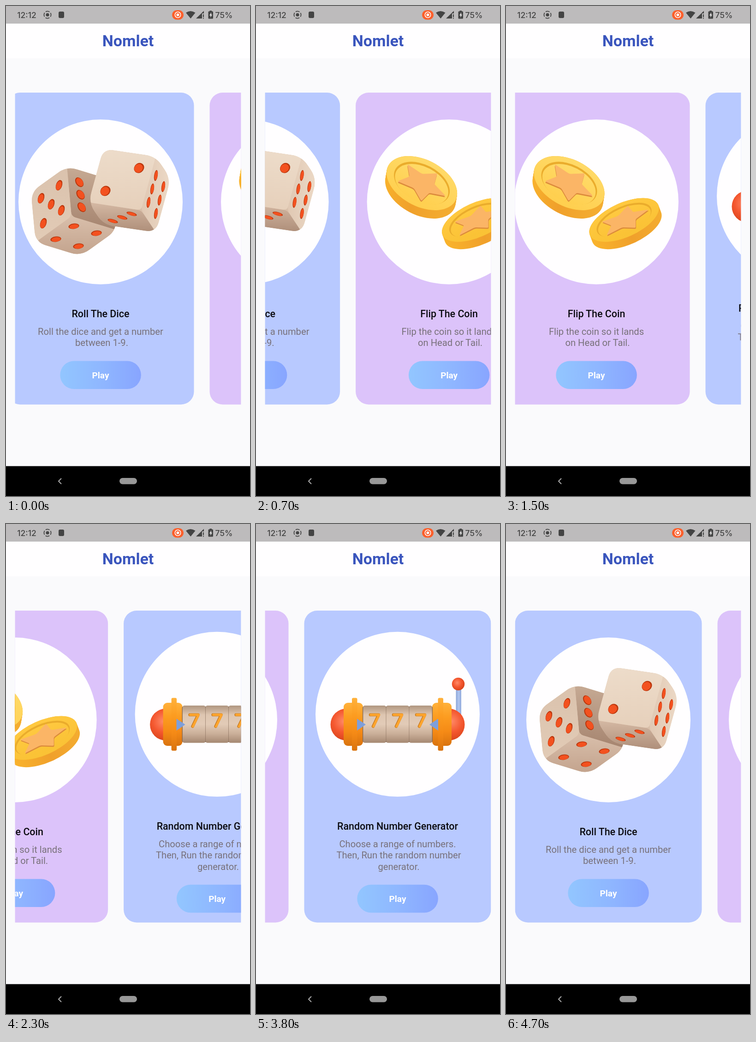
An HTML page for the animation above (4.8 s loop, 529 by 1058 pixels).

```html
<!DOCTYPE html>
<html lang="en">
<head>
<meta charset="utf-8">
<title>Nomlet</title>
<style>
  html, body { margin: 0; width: 100%; height: 100%; overflow: hidden; background: #fafafc; }
  svg { display: block; width: 100vw; height: 100vh; }
  text { font-family: Roboto, sans-serif; text-anchor: middle; }
  .brand { font-size: 34px; font-weight: 700; fill: #3a55bd; }
  .title { font-size: 21.4px; font-weight: 500; fill: #0b0b10; }
  .desc { font-size: 20.2px; fill: #78717a; }
  .play { font-size: 19px; font-weight: 600; fill: #fff; }
  .status { font: 500 17.5px Inter, sans-serif; fill: #444; }
</style>
</head>
<body>
<svg id="stage" viewBox="0 0 529 1058" xmlns="http://www.w3.org/2000/svg"></svg>
<script>
const LOOP = 4800, STEP = 100;
const CARD_W = 405, PITCH = 439, LEFT = 19.5;

const easeOut = power => u => 1 - (1 - u) ** power;
const smooth = u => u * u * (3 - 2 * u);
const SWIPES = [
  { begin: 0, end: 900, from: 17, to: 283, ease: easeOut(1.25) },
  { begin: 1000, end: 1500, from: 283, to: 465, ease: smooth },
  { begin: 1900, end: 3100, from: 465, to: 793, ease: easeOut(1.92) },
  { begin: 3800, end: 4400, from: 793, to: 0, ease: smooth }
];

function scrollAt(t) {
  const { begin, end, from, to, ease } = SWIPES.findLast(swipe => swipe.begin <= t);
  return from + (to - from) * ease(Math.min(1, (t - begin) / (end - begin)));
}

const defs = [];
function gradient(id, vertical, ...colors) {
  const stops = colors.map((c, i) =>
    `<stop offset="${i / (colors.length - 1)}" stop-color="${c}"/>`).join('');
  defs.push(`<linearGradient id="${id}" x2="${vertical ? 0 : 1}" y2="${vertical ? 1 : 0}">${stops}</linearGradient>`);
  return `url(#${id})`;
}

const path = (d, fill, extra = '') => `<path d="${d}" fill="${fill}" ${extra}/>`;
const rect = (x, y, w, h, r, fill) => `<rect x="${x}" y="${y}" width="${w}" height="${h}" rx="${r}" fill="${fill}"/>`;
const circle = (x, y, r, fill, extra = '') => `<circle cx="${x}" cy="${y}" r="${r}" fill="${fill}" ${extra}/>`;
const text = (x, y, cls, s) => `<text x="${x}" y="${y}" class="${cls}">${s}</text>`;
const group = (transform, content) => `<g transform="${transform}">${content}</g>`;

const add = (...vectors) => vectors.reduce(([x, y], [dx, dy]) => [x + dx, y + dy]);
const scale = ([x, y], k) => [x * k, y * k];

function roundedPolygon(points, radius) {
  const toward = (p, q) => {
    const d = [q[0] - p[0], q[1] - p[1]];
    return add(p, scale(d, radius / Math.hypot(...d)));
  };
  return points.map((p, i) => {
    const before = points.at(i - 1), after = points[(i + 1) % points.length];
    return `${i ? 'L' : 'M'}${toward(p, before)}Q${p} ${toward(p, after)}`;
  }).join('') + 'Z';
}

// Pip centres on a unit square.
function pipSpots(n) {
  const lo = .25, mid = .5, hi = .75;
  return [
    ...(n % 2 ? [[mid, mid]] : []),
    ...(n > 1 ? [[lo, lo], [hi, hi]] : []),
    ...(n > 3 ? [[lo, hi], [hi, lo]] : []),
    ...(n > 5 ? [[mid, lo], [mid, hi]] : [])
  ];
}

function dieFace(origin, u, v, pips, fill) {
  const corners = [origin, add(origin, u), add(origin, u, v), add(origin, v)];
  const spots = pipSpots(pips).map(([i, j]) =>
    circle(i, j, .093, '#bb370d') + circle(i + .005, j + .008, .079, '#f3511f')).join('');
  return path(roundedPolygon(corners, 9), fill) + group(`matrix(${[...u, ...v, ...origin]})`, spots);
}

// A cube seen from corner v with edges a (up), b (left) and c (right).
function die(id, v, a, b, c, pips, fills) {
  const outline = [add(v, a), add(v, a, b), add(v, b), add(v, b, c), add(v, c), add(v, a, c)];
  const d = roundedPolygon(outline, 23);
  defs.push(`<clipPath id="${id}">${path(d, '#000')}</clipPath>`);
  return `<g clip-path="url(#${id})">` + path(d, '#d8bfa9') +
    dieFace(v, a, c, pips[1], fills[1]) +
    dieFace(v, b, c, pips[2], fills[2]) +
    dieFace(add(v, a), scale(a, -1), b, pips[0], fills[0]) + '</g>';
}

function dice() {
  const light = gradient('light', true, '#eddcca', '#e6d0bb');
  const side = gradient('side', false, '#e0c8b3', '#ecd9c6');
  const low = gradient('low', true, '#d4b8a3', '#ae8e79');
  const left = gradient('left', true, '#dac2ad', '#e2cbb6');
  const dark = gradient('dark', true, '#c6aa94', '#a68570');
  const base = gradient('base', true, '#d8beaa', '#c3a38d');
  return die('dieA', [159, 454], [-10, -108], [-78, 56], [98, 30], [5, 6, 4], [left, dark, base]) +
    die('dieB', [310, 441], [32, -116], [-114, -17], [32, 48], [2, 6, 3], [light, side, low]);
}

function starPath(radius, inner, phase) {
  const points = Array.from({ length: 10 }, (_, i) => {
    const angle = (phase + i * 36) * Math.PI / 180, r = i % 2 ? inner : radius;
    return [r * Math.cos(angle), r * Math.sin(angle)];
  });
  return roundedPolygon(points, .05);
}

function coin(id, x, y, rx, ry, turn, dx, dy, light, shade) {
  const edge = gradient(id + 'Edge', false, '#f9b32c', '#f0a02b', '#f4ad30');
  const face = gradient(id + 'Face', true, light, shade);
  const layer = (k, content) =>
    group(`translate(${x + dx * k} ${y + dy * k}) rotate(${turn}) scale(${rx} ${ry})`, content);
  const star = starPath(.72, .37, 2);
  let rim = '';
  for (let k = 1; k > 0; k -= .1) rim += layer(k, circle(0, 0, 1, edge));
  return rim +
    layer(0, circle(0, 0, 1, face) + circle(0, 0, .79, '#eaac2c')) +
    layer(.15, circle(0, 0, .755, face) + path(star, '#dc8b3c')) +
    layer(0, path(star, '#fbb566'));
}

function coins() {
  return coin('gold', 137, 382.5, 82, 50.5, 27, -3, 18, '#ffda68', '#ffcf4e') +
    coin('amber', 256, 462, 81, 37, -24, 6, 16, '#ffc940', '#fac235');
}

function slots() {
  defs.push(`<radialGradient id="ball" cx=".42" cy=".4" r=".62"><stop stop-color="#ff8a68"/>
    <stop offset=".55" stop-color="#f4572f"/><stop offset="1" stop-color="#d8431b"/></radialGradient>`);
  const ball = 'url(#ball)', blue = '#7e9fdb', middle = 307;
  const hub = gradient('hub', true, '#ffb13b', '#fc9c20', '#f58a16', '#d9730f');
  const reel = gradient('reel', true, '#b09680', '#dec6b1', '#e2cbb7', '#cbb09a', '#a58872');
  const lever = gradient('lever', false, '#8ba5d8', '#b0c6f0', '#91a9dc');
  const end = circle(196, 433, 34.5, ball) + rect(190, 386, 42, 93, 9, hub) + rect(208, 375.5, 11.5, 114, 3, hub);
  const pointer = path('M219 420.5L238 433L219 446Z', blue);
  const mirrored = content => group(`translate(${2 * middle} 0) scale(-1 1)`, content);
  const seven = (x, color, width) => path(`M${x - 9} 412H${x + 9}L${x - 3} 437`, 'none',
    `stroke="${color}" stroke-width="${width}" stroke-linecap="round" stroke-linejoin="round"`);
  const cells = [-50, 0, 50].map(dx => {
    const x = middle + dx;
    return rect(x - 24.7, 392, 49.4, 80.5, 4, reel) + seven(x, '#c47920', 6.5) + seven(x + .7, '#ffa52e', 5);
  }).join('');
  return rect(433.5, 354, 11.5, 60, 0, lever) + circle(438.5, 345.5, 13.7, ball) +
    end + mirrored(end) + rect(231, 394, 152, 77, 3, '#806654') + cells + pointer + mirrored(pointer);
}

const buttonFill = gradient('button', false, '#92c6ff', '#8fb7ff', '#88a5ff');

// Artwork is drawn around originX, the middle of its card.
function card(index, color, originX, art, title, lines) {
  const lift = (lines.length - 2) * 12.2;
  const mid = CARD_W / 2;
  return group(`translate(${LEFT + index * PITCH} 0)`,
    rect(0, 187, CARD_W, 673.5, 28, color) +
    circle(mid, 423 - lift, 178, '#fffeff') +
    group(`translate(${mid - originX} 0)`, art) +
    text(mid, 672 - lift, 'title', title) +
    lines.map((line, i) => text(mid + (i ? 2.5 : 0), 710 - lift + i * 24.4, 'desc', line)).join('') +
    rect(mid - 87.7, 766.5 + lift, 175.5, 60.5, 30.2, buttonFill) +
    text(mid, 803.5 + lift, 'play', 'Play'));
}

function statusBar() {
  const ink = '#444';
  return rect(0, 0, 529, 38, 0, '#bdbbbc') +
    text(45, 25.5, 'status', '12:12') + text(472.5, 25.5, 'status', '75%') +
    circle(90, 19, 7.6, 'none', `stroke="${ink}" stroke-width="1.8" stroke-dasharray="9 2.94" stroke-dashoffset="4.5"`) +
    circle(90, 19, 3.6, ink) + rect(114, 12, 12, 14, 3, ink) +
    rect(360, 9, 25, 20.5, 10, '#fb5f2c') +
    circle(372.5, 19, 6.2, 'none', 'stroke="#fff" stroke-width="1.6"') + circle(372.5, 19, 3, '#fff') +
    path('M390 14.5Q400 7.5 410.5 14.5L400.3 27Z', ink) +
    path('M412 27L429 10.5V16H425V27Z', ink) + rect(427, 18, 2, 6, 0, ink) + rect(427, 25.5, 2, 2, 0, ink) +
    rect(438.5, 11.5, 10.5, 16, 1.5, ink) + rect(441.5, 10, 4.5, 3, 0, ink) +
    path('M445 14L440.8 20.5H443.3V25L447 18.5H445Z', '#ddd');
}

const cards =
  card(0, '#b8c9ff', 222, dice(), 'Roll The Dice',
    ['Roll the dice and get a number', 'between 1-9.']) +
  card(1, '#dcc3fa', 196, coins(), 'Flip The Coin',
    ['Flip the coin so it lands', 'on Head or Tail.']) +
  card(2, '#b8c9ff', 307, slots(), 'Random Number Generator',
    ['Choose a range of numbers.', 'Then, Run the random number', 'generator.']);

document.getElementById('stage').innerHTML =
  `<defs>${defs.join('')}<clipPath id="view"><rect x="19.6" y="180" width="489.8" height="690"/></clipPath></defs>` +
  rect(0, 0, 529, 1058, 0, '#fafafc') + rect(0, 38, 529, 75, 0, '#fffeff') + statusBar() +
  text(264.5, 87, 'brand', 'Nomlet') +
  `<g clip-path="url(#view)"><g id="track">${cards}</g></g>` +
  rect(0, 993.5, 529, 65, 0, '#000') +
  path('M120 1020L114 1026L120 1032', 'none', 'stroke="#aaa" stroke-width="2"') +
  rect(246, 1019, 38, 13.5, 6.7, '#989898');

const track = document.getElementById('track');
const start = performance.now();

function render() {
  const t = Math.max(0, performance.now() - start) % LOOP;
  const stepped = Math.floor(t / STEP) * STEP;
  track.setAttribute('transform', `translate(${-scrollAt(stepped)} 0)`);
  requestAnimationFrame(render);
}
render();
</script>
</body>
</html>
```
